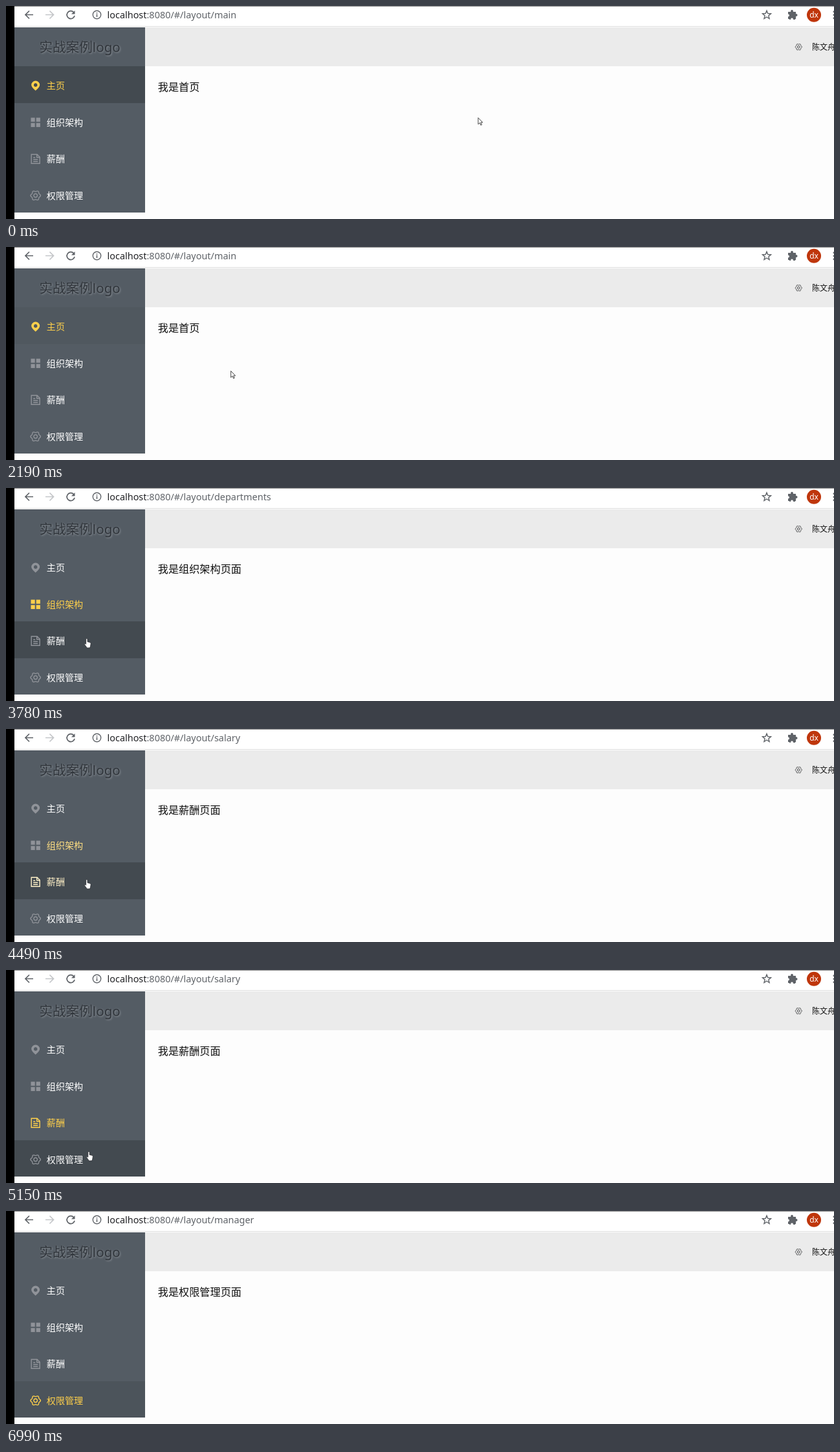
An HTML page that plays this animation: 1280x329 px, repeating every 8.1 s.

```html
<!DOCTYPE html>
<html lang="zh-CN">
<head>
<meta charset="utf-8">
<title>Side menu</title>
<style>
  html, body { margin: 0; width: 100%; height: 100%; overflow: hidden; background: #fdfdfd; }
  svg { display: block; width: 100%; height: 100%; }
  rect { shape-rendering: crispEdges; }
  text { font-family: "Noto Sans", "Noto Sans CJK SC", "Noto Sans CJK", sans-serif; white-space: pre; }
  .cjk { font-family: "Noto Sans CJK SC", "Noto Sans CJK", sans-serif; }
  .line { fill: none; stroke: #5f6368; stroke-width: 1.7; }
  .thin { fill: none; stroke: currentColor; stroke-width: 1.4; }
  .logo { font-size: 20.6px; fill: #30353b; text-shadow: 1px 1px 3px #8f959b; }
</style>
</head>
<body>
<svg viewBox="0 0 1280 329">
  <rect width="1280" height="329" fill="#fdfdfd"/>
  <rect width="1280" height="32" fill="#fff"/>
  <rect width="1280" height="1" fill="#8c8c8c"/>
  <rect y="31" width="1280" height="1" fill="#dedede"/>
  <rect x="215" y="33" width="1065" height="60" fill="#ebebeb"/>
  <rect x="13" y="33" width="202" height="286" fill="#545c64"/>
  <rect width="13" height="329"/>

  <g class="line">
    <path d="M42 13.5H30M36 7.5l-6 6l6 6"/>
    <path d="M61 13.5H73M67.500 7.500l6 6l-6 6" stroke="#c4c6c9"/>
    <path d="M104.500 9.500A6 6 0 1 0 106 15"/>
    <circle cx="140.500" cy="13.500" r="6.200" stroke-width="1.400"/>
    <path d="M140.500 12.500v4.500m0-7v1.500" stroke-width="1.500"/>
    <path id="star" stroke-width="1.400"/>
  </g>
  <g fill="#5f6368">
    <path d="M106.500 7v5.500h-5.500z"/>
    <rect x="1209" y="8.500" width="12" height="12" rx="1.500"/>
    <circle cx="1215" cy="8" r="2"/><circle cx="1221.500" cy="14" r="2"/>
    <circle cx="1209" cy="14.500" r="2" fill="#fff"/><circle cx="1215" cy="20.500" r="2" fill="#fff"/>
    <path d="M1280 8.700v10" stroke="#5f6368" stroke-width="3" stroke-linecap="round" stroke-dasharray="0 5"/>
  </g>
  <circle cx="1249" cy="13.700" r="11" fill="#bf360c"/>
  <text x="1249" y="17.800" font-size="12" fill="#fff" text-anchor="middle">dx</text>
  <text x="156.500" y="18.500" font-size="14.450" fill="#202124">localhost<tspan id="url" fill="#5f6368"></tspan></text>

  <text class="logo" x="51.500" y="71">实战案例logo</text>
  <g id="cog" transform="translate(1225.300 63.300) scale(.66)" color="#303133"></g>
  <text class="cjk" x="1246" y="68" font-size="12" fill="#111">陈文舟</text>
  <text class="cjk" id="page" x="234.800" y="130.700" font-size="16.150" fill="#111"></text>
  <g id="menu"></g>

  <path id="arrow" d="M.5 .5v10l2.400-2.200l1.600 3.700l1.600-.7l-1.600-3.500h3z" fill="#fff" stroke="#333" stroke-width=".9"/>
  <path id="hand" d="M2.600 8.700v-7a1.200 1.200 0 0 1 2.400 0v3.800l4 .9q1.300 .4 1.200 1.800l-.6 4q-.2 1-.8 1.700v1h-5.200v-1l-3-4q-.6-1 .3-1.500 .8-.3 1.700 .8z" fill="#fff" stroke="#25282c" stroke-width=".8"/>
</svg>
<script>
const LOOP = 8100, TOP = 93, ROW = 56.5, LEAVE = 6990;
const WHITE = [255, 255, 255], GOLD = [255, 208, 75], BASE = [84, 92, 100], DARK = [67, 74, 80];
const $ = id => document.getElementById(id);
const clamp = v => Math.max(0, Math.min(1, v));
const lerp = (a, b, k) => a + (b - a) * k;
const mix = (a, b, k) => `rgb(${a.map((v, i) => Math.round(lerp(v, b[i], k)))})`;

// Closed outline from a radius function of index and angle
function polar(n, radius) {
  const pts = Array.from({ length: n }, (_, i) => {
    const a = i / n * 2 * Math.PI - Math.PI / 2, r = radius(i, a);
    return (r * Math.cos(a)).toFixed(2) + ' ' + (r * Math.sin(a)).toFixed(2);
  });
  return 'M' + pts.join('L') + 'Z';
}

const gear = `<path class="thin" d="${polar(72, (i, a) => 6.9 + .8 * Math.cos(6 * a))}"/><circle class="thin" r="2.8"/>`;
const pin = '<path fill="currentColor" fill-rule="evenodd" d="M0 7.500Q-6.500 2-6.500-1.200a6.500 6.500 0 0 1 13 0Q6.500 2 0 7.500ZM0-4a2.800 2.800 0 1 0 .01 0Z"/>';
const grid = [-7.2, 1].flatMap(x => [-7.2, 1].map(y =>
  `<rect x="${x}" y="${y}" width="6.200" height="6.200" fill="currentColor" style="shape-rendering:auto"/>`)).join('');
const sheet = '<path class="thin" d="M-6.500-7h9l4 4V7h-13zM2-7v4.500h4.500M-3.500-2h3m-3 3h7m-7 3h7"/>';

const items = [
  { label: '主页', page: '我是首页', path: 'main', icon: pin, at: -1000 },
  { label: '组织架构', page: '我是组织架构页面', path: 'departments', icon: grid, at: 3100 },
  { label: '薪酬', page: '我是薪酬页面', path: 'salary', icon: sheet, at: 4490 },
  { label: '权限管理', page: '我是权限管理页面', path: 'manager', icon: gear, at: 5980 }
];

// Pointer moves; each one starts where the last ended
const moves = [
  { from: 0, to: 240, x: 643, y: 190 },
  { from: 240, to: 820, x: 367, y: 196 },
  { from: 2176, to: 2470, x: 119, y: 134 },
  { from: 2470, to: 2850, x: 97, y: 171 },
  { from: 3230, to: 3780, x: 121, y: 232 },
  { from: 4700, to: 5000, x: 132, y: 265 },
  { from: 5000, to: 5300, x: 121, y: 286 },
  { from: 6500, to: 6980, x: 197, y: 287 }
];

function pointer(t) {
  return moves.reduce((p, m) => {
    const k = Math.sin(clamp((t - m.from) / (m.to - m.from)) * Math.PI / 2);
    return { x: lerp(p.x, m.x, k), y: lerp(p.y, m.y, k) };
  }, { x: 730, y: 172 });
}

const inMenu = p => p.x < 215;

// Darkness of a row: pointer over it (with a short lag), or focus fading out
function shade(i, t) {
  const last = items.length - 1;
  if (t >= LEAVE) return i === last ? .45 : 0;
  const p = pointer(t - 120);
  if (inMenu(p)) return i === Math.floor((p.y - TOP) / ROW) ? 1 : 0;
  return i === 0 ? clamp((2230 - t) / 160) : 0;
}

function place(el, show, p) {
  el.setAttribute('visibility', show ? 'visible' : 'hidden');
  el.setAttribute('transform', `translate(${p.x} ${p.y})`);
}

$('star').setAttribute('d', polar(10, i => i % 2 ? 3 : 6.8));
$('star').setAttribute('transform', 'translate(1176 14)');
$('cog').innerHTML = gear;
$('menu').innerHTML = items.map((it, i) => {
  const y = TOP + i * ROW, mid = y + ROW / 2;
  return `<g><rect x="13" y="${y}" width="202" height="${ROW}"/>
    <g transform="translate(45.700 ${mid + 2})">${it.icon}</g>
    <text class="cjk" x="62.800" y="${mid + 6.9}" font-size="14.100">${it.label}</text></g>`;
}).join('');
const rows = [...$('menu').children].map(g => g.children);

function draw(t) {
  const active = items.filter(it => it.at <= t).length - 1;
  const k = clamp(.3 + (t - items[active].at) / 340);

  $('url').textContent = ':8080/#/layout/' + items[active].path;
  $('page').textContent = items[active].page;
  rows.forEach(([bg, icon, label], i) => {
    const gold = i === active ? k : i === active - 1 ? 1 - k : 0;
    const color = mix(WHITE, GOLD, gold);
    bg.setAttribute('fill', mix(BASE, DARK, shade(i, t)));
    icon.setAttribute('color', i === active ? color : '#909399');
    label.setAttribute('fill', color);
  });

  const p = pointer(t);
  place($('arrow'), !inMenu(p), p);
  place($('hand'), inMenu(p) && t < LEAVE, p);
}

function tick() {
  draw(performance.now() % LOOP);
  requestAnimationFrame(tick);
}
tick();
</script>
</body>
</html>
```
